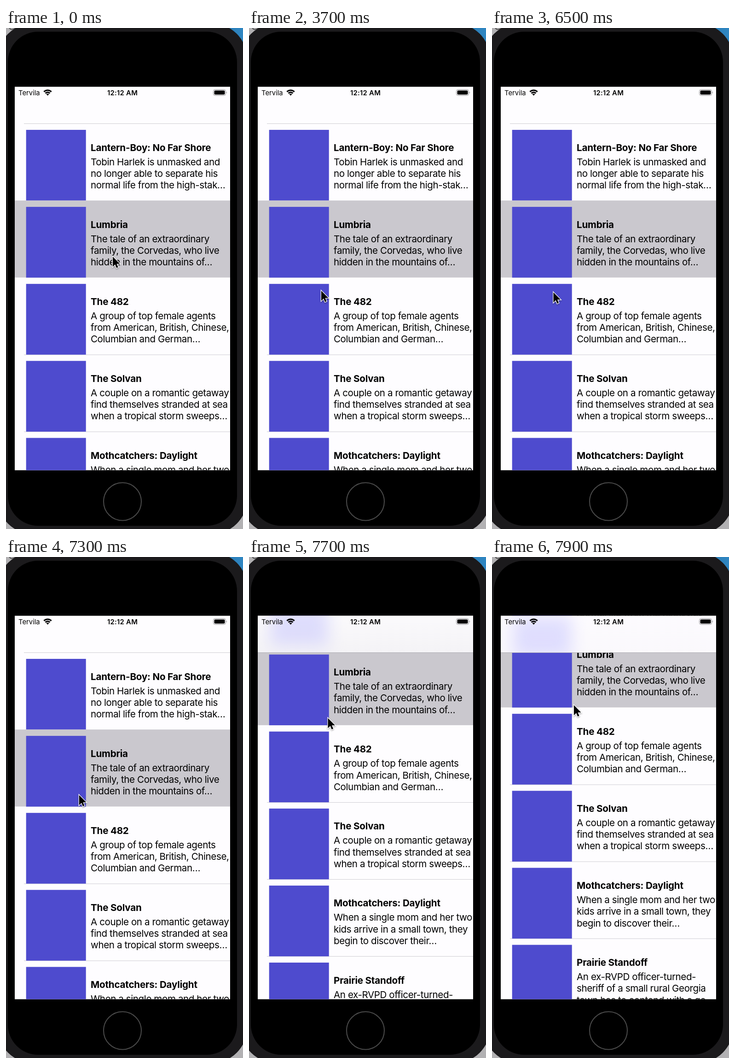
Recreate the animation shown at these times as an HTML page. Size 515 px wide and 1087 px high, loop 8000 ms.

```html
<!DOCTYPE html>
<html lang="en">
<head>
<meta charset="utf-8">
<title>Movie list</title>
<style>
  html, body { margin: 0; width: 100%; height: 100%; overflow: hidden; background: #000; }
  svg { display: block; width: 515px; height: 1087px; font-family: Inter, Roboto, sans-serif; }
  .title { font-size: 20.6px; font-weight: 700; letter-spacing: -0.2px; }
  .body { font-size: 20.6px; letter-spacing: -0.42px; }
  .status { font-size: 14.8px; }
  .clock { font-weight: 600; letter-spacing: 0.3px; text-anchor: middle; }
</style>
</head>
<body>
<svg viewBox="0 0 515 1087">
  <defs>
    <clipPath id="screen"><rect x="19" y="127.5" width="468" height="832"/></clipPath>
    <clipPath id="bar"><rect x="19" y="127.5" width="468" height="80"/></clipPath>
    <filter id="blur" x="-50%" y="-80%" width="200%" height="260%"><feGaussianBlur stdDeviation="17"/></filter>
    <filter id="shade" x="-50%" y="-50%" width="200%" height="200%">
      <feDropShadow dx="0" dy="1.5" stdDeviation="1.5" flood-opacity=".4"/>
    </filter>
    <linearGradient id="sky" x1="0" x2="1">
      <stop offset="0" stop-color="#256a9c"/><stop offset="1" stop-color="#2f86c2"/>
    </linearGradient>
    <linearGradient id="barFill" x1="0" y1="0" x2="0" y2="1">
      <stop offset="0" stop-color="#fbfafc"/><stop offset="1" stop-color="#f4f3f6"/>
    </linearGradient>
  </defs>

  <!-- desktop and phone body -->
  <rect width="515" height="1087" fill="#b2b1b3"/>
  <rect x="400" width="115" height="540" fill="url(#sky)"/>
  <path d="M7 -1 Q9 4 14 3 Q19 2 21 -1" fill="none" stroke="#555" stroke-width="2"/>
  <rect x="-18" y="-10" width="542" height="1108" rx="77" fill="#1b1a1c"/>
  <rect x="4" y="8" width="498" height="1072" rx="66"/>
  <circle cx="253" cy="1027.5" r="41" fill="none" stroke="#4b4b4b" stroke-width="2"/>

  <g clip-path="url(#screen)">
    <rect x="19" y="127" width="468" height="833" fill="#fefdff"/>
    <g id="list"></g>
    <g id="nav" clip-path="url(#bar)">
      <rect x="19" y="127" width="468" height="81" fill="#fdfbff"/>
      <rect id="tint" x="19" y="127" width="468" height="81" fill="url(#barFill)"/>
      <rect id="glow" x="46" width="126" height="88" fill="#b9b8ff" opacity=".42" filter="url(#blur)"/>
    </g>
    <rect id="navLine" y="207" height="1"/>
  </g>

  <!-- status bar -->
  <text class="status" x="27" y="146">Tervila</text>
  <text class="status clock" x="253" y="146">12:12 AM</text>
  <g fill="none" stroke="#000" stroke-width="3.1">
    <path d="M82.4 138.4 A11.4 11.4 0 0 1 98.6 138.4"/>
    <path d="M85.6 141.6 A6.9 6.9 0 0 1 95.4 141.6"/>
    <path d="M90.5 146.8 L87.5 143.7 A4.2 4.2 0 0 1 93.5 143.7 Z" fill="#000" stroke="none"/>
  </g>
  <rect x="450.5" y="133.5" width="27" height="13" rx="4" fill="none" stroke="#929194"/>
  <rect x="452.5" y="135.5" width="23" height="9" rx="2.3"/>
  <path d="M479 138 Q481 140 479 142 Z" fill="#929194"/>

  <path id="cursor" d="M0 0 V22 L5.1 17.1 L8.2 24.5 L11.6 23 L8.5 15.8 H15.5 Z"
        stroke="#fff" stroke-width="2.4" paint-order="stroke" filter="url(#shade)"/>
</svg>
<script>
const LOOP = 8000, TICK = 100, TOP = 207.5, ROW = 167.1, SELECTED = 1;
const BASELINES = [90, 115.3, 140.6];

const movies = [
  ["Lantern-Boy: No Far Shore", "Tobin Harlek is unmasked and", "no longer able to separate his", "normal life from the high-stak…"],
  ["Lumbria", "The tale of an extraordinary", "family, the Corvedas, who live", "hidden in the mountains of…"],
  ["The 482", "A group of top female agents", "from American, British, Chinese,", "Columbian and German…"],
  ["The Solvan", "A couple on a romantic getaway", "find themselves stranded at sea", "when a tropical storm sweeps…"],
  ["Mothcatchers: Daylight", "When a single mom and her two", "kids arrive in a small town, they", "begin to discover their…"],
  ["Prairie Standoff", "An ex-RVPD officer-turned-", "sheriff of a small rural Georgia", "town has to contend with a go…"]
];

// time, x, y of the pointer tip
const pointer = [
  [0, 232, 496], [1900, 232, 496], [2300, 205, 522], [2800, 163, 562], [3200, 157, 570],
  [6000, 157, 570], [6300, 141, 574], [6500, 133.5, 573.5], [6800, 135, 571],
  [7200, 155, 524], [7600, 170.5, 493.5], [7700, 171.5, 349.5], [7800, 175.5, 330], [7900, 178, 321.5]
];
// time, list offset
const scroll = [[0, 0], [7600, 0], [7700, 176.5], [7800, 201], [7900, 215]];

const get = id => document.getElementById(id);
const rect = (x, y, w, h, fill) => `<rect x="${x}" y="${y}" width="${w}" height="${h}" fill="${fill}"/>`;
const text = (cls, y, str) => `<text class="${cls}" x="184" y="${y}">${str}</text>`;

function row([title, ...lines], i) {
  const y = TOP + i * ROW;
  const on = i === SELECTED, beforeOn = i + 1 === SELECTED;
  return (on ? rect(19, y - 0.3, 468, ROW, "#cac8ce") : "")
    + (on || beforeOn ? "" : rect(39, Math.round(y + ROW) - 0.5, 448, 1, "#cfced3"))
    + rect(43.7, y + 13.5, 130, 153.5, "#4e4bce")
    + text("title", y + 59, title)
    + lines.map((line, n) => text("body", y + BASELINES[n], line)).join("");
}

function sample(table, t) {
  let i = table.length - 1;
  while (i > 0 && table[i][0] > t) i--;
  const a = table[i], b = table[i + 1] || a;
  const k = a === b ? 0 : (t - a[0]) / (b[0] - a[0]);
  return a.slice(1).map((v, n) => v + (b[n + 1] - v) * k);
}

function draw(ms) {
  const t = Math.floor(ms % LOOP / TICK) * TICK;
  const [x, y] = sample(pointer, t);
  const [offset] = sample(scroll, t);
  const moved = offset > 0;
  const past = Math.max(0, offset - 176.5);
  get("cursor").setAttribute("transform", `translate(${x} ${y})`);
  get("list").setAttribute("transform", `translate(0 ${-offset})`);
  get("nav").style.display = moved ? "" : "none";
  get("glow").setAttribute("y", 104 + past * 0.65);
  get("tint").setAttribute("opacity", 1 - past / 55);
  const line = get("navLine");
  line.setAttribute("x", moved ? 19 : 39);
  line.setAttribute("width", moved ? 468 : 448);
  line.setAttribute("fill", moved ? "#aeadb3" : "#cfced3");
}

get("list").innerHTML = movies.map(row).join("");
const start = performance.now();
function loop() {
  draw(performance.now() - start);
  requestAnimationFrame(loop);
}
loop();
</script>
</body>
</html>
```
